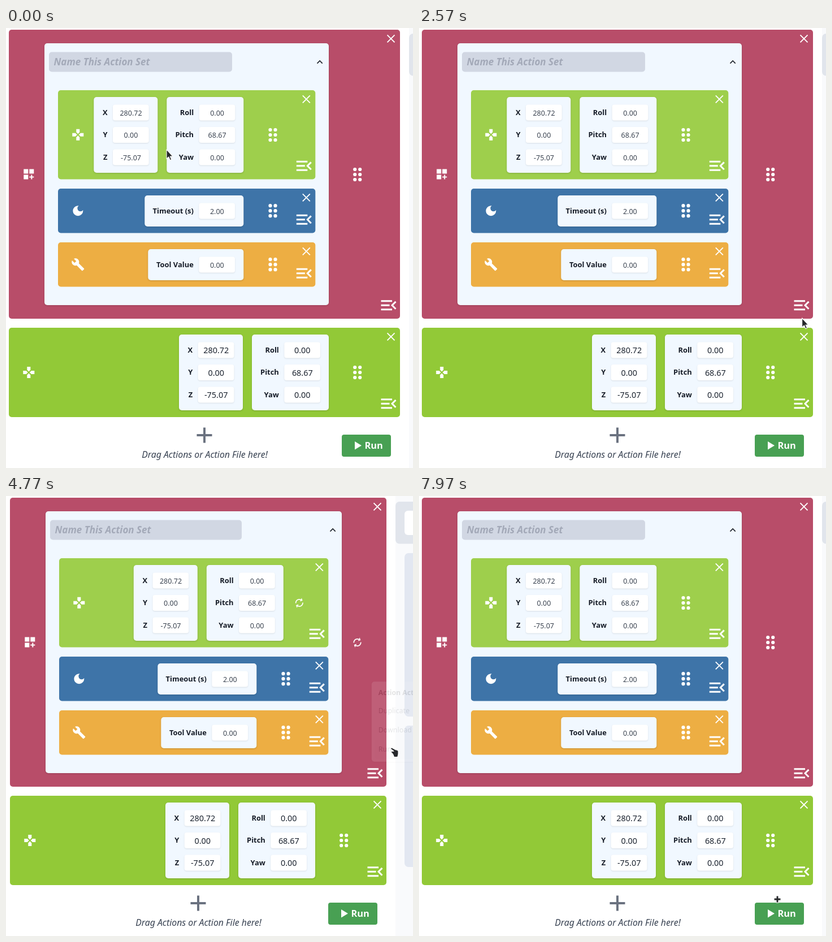
Recreate the animation shown at these times as an HTML page. Size 720 by 778 pixels, loop 8 s.

```html
<!DOCTYPE html>
<html lang="en">
<head>
<meta charset="utf-8">
<title>Action list</title>
<style>
html, body { margin: 0; width: 100%; height: 100%; overflow: hidden; background: #fff; }
svg { display: block; width: 100vw; height: 100vh; }
text { font-family: "Fira Sans", "Noto Sans", "Open Sans", sans-serif; }
.box { fill: #f1f8ff; filter: drop-shadow(0 1px 1.5px rgba(0,0,0,.16)); }
.input { fill: #fff; filter: drop-shadow(0 1px 1px rgba(0,0,0,.1)); }
.label { font-size: 12.9px; font-weight: 600; fill: #151b26; text-anchor: end; }
.value { font-size: 12.5px; fill: #3a4350; text-anchor: middle; }
.big { font-size: 14.4px; fill: #1c2430; }
.icon, .dots { fill: #fff; }
.line { fill: none; stroke: #fff; stroke-width: 1.9; }
.name { font-size: 17px; font-weight: 600; font-style: italic; fill: #a3a9b8; }
.hint { font-size: 15.8px; font-style: italic; fill: #374151; text-anchor: middle; }
.run { font-size: 16.4px; font-weight: 600; fill: #fff; }
.menu text { font-size: 13px; fill: #1c222c; }
.menu .head { font-size: 12.8px; font-weight: 700; fill: #000; }
.sheet { fill: #fff; filter: drop-shadow(0 1px 3px rgba(0,0,0,.25)); }
.cursor path { fill: #26282b; stroke: #fff; stroke-width: 1.1; stroke-linejoin: round; }
</style>
</head>
<body>
<svg id="stage" viewBox="0 0 720 778" preserveAspectRatio="none"></svg>
<script>
const LOOP = 8000;
const RUN = 4700, PAUSE = 4960, TOOL = 6990, DONE = 7180;
const MENU = { open: 3030, shown: 3130, close: 4690, gone: 4780 };

const ICON = {
  pad: "M15 7.5V2H9v5.5l3 3zM7.5 9H2v6h5.5l3-3zM9 16.5V22h6v-5.5l-3-3zM16.5 9l-3 3 3 3H22V9z",
  moon: "M12 3a9 9 0 1 0 9 9c0-.46-.04-.92-.1-1.36a5.39 5.39 0 0 1-4.4 2.26 5.4 5.4 0 0 1-3.14-9.8C12.92 3.04 12.46 3 12 3z",
  tool: "M22.7 19l-9.1-9.1c.9-2.3.4-5-1.5-6.9-2-2-5-2.4-7.4-1.3L9 6 6 9 1.6 4.7C.4 7.1.9 10.1 2.9 12.1c1.9 1.9 4.6 2.4 6.9 1.5l9.1 9.1c.4.4 1 .4 1.4 0l2.3-2.3c.5-.4.5-1.1.1-1.4z",
  set: "M3 3h8v8H3zM13 3h8v8h-8zM3 13h8v8H3zM18 13h-2v3h-3v2h3v3h2v-3h3v-2h-3z",
  more: "M3 18h13v-2H3zM3 13h10v-2H3zM3 6v2h13V6zM21 15.6L17.4 12 21 8.4 19.6 7l-5 5 5 5z",
  spin: "M12 6v3l4-4-4-4v3c-4.42 0-8 3.58-8 8 0 1.57.46 3.03 1.24 4.26L6.7 14.8A6 6 0 0 1 12 6zm6.76 1.74L17.3 9.2A6 6 0 0 1 12 18v-3l-4 4 4 4v-3c4.42 0 8-3.58 8-8 0-1.57-.46-3.03-1.24-4.26z"
};

const rect = (x, y, w, h, r, attr) =>
  `<rect x="${x}" y="${y}" width="${w}" height="${h}" rx="${r}" ${attr}/>`;
const text = (x, y, cls, s) => `<text x="${x}" y="${y}" class="${cls}">${s}</text>`;
const icon = (name, cx, cy, k = 1) =>
  `<path class="icon" d="${ICON[name]}" transform="translate(${cx} ${cy}) scale(${k}) translate(-12 -12)"/>`;

function dots(cx, cy) {
  let s = "";
  for (const dx of [-4.5, 4.5]) for (const dy of [-9, 0, 9])
    s += `<circle cx="${cx + dx}" cy="${cy + dy}" r="3.1"/>`;
  return `<g class="dots" data-x="${cx}" data-y="${cy}">${s}</g>`;
}

const spinner = (cx, cy, start) =>
  `<g class="spin" data-x="${cx}" data-y="${cy}" data-start="${start}">
   <path d="${ICON.spin}" transform="scale(.88) translate(-12 -12)"/></g>`;

// Coloured card with its close and menu buttons
function card(x, y, right, bottom, color, name) {
  const cx = right - 16, cy = y + 15.8;
  return rect(x, y, right - x, bottom - y, 5, `fill="${color}"`) +
    icon(name, x + 35.3, (y + bottom) / 2) +
    `<path class="line" d="M${cx - 6.5} ${cy - 6.5}l13 13m0-13l-13 13"/>` +
    icon("more", right - 20, bottom - 23.7, 1.5);
}

const handle = (right, cy, busy, start) =>
  busy ? spinner(right - 51.5, cy, start) : dots(right - 75.3, cy);

function input(x, cy, label, value, big) {
  return text(x - 9.5, cy + 4, "label", label) +
    rect(x, cy - 14, 63.7, 28, 4, 'class="input"') +
    text(x + 32, cy + (big ? 5.6 : 5), "value " + (big ? "big" : ""), value);
}

function pose(end, y, big) {
  const x = end - 265, x2 = end - 136;
  let s = rect(x, y + 12, 113, 134, 5, 'class="box"') + rect(x2, y + 12, 136, 134, 5, 'class="box"');
  [["X", "280.72", "Roll", "0.00"], ["Y", "0.00", "Pitch", "68.67"], ["Z", "-75.07", "Yaw", "0.00"]]
    .forEach(([a, av, b, bv], i) => {
      const cy = y + 39.5 + i * 39.5;
      s += input(x + 33.7, cy, a, av, big) + input(x2 + 57.3, cy, b, bv, big);
    });
  return s;
}

const single = (end, y, w, label, value) =>
  rect(end - w, y + 12, w, 55, 5, 'class="box"') + input(end - 79, y + 39.5, label, value);

// step: 0 idle, 1 move, 2 pause, 3 tool
function scene(step) {
  const on = step > 0;
  const L = on ? 7 : 5, R = on ? 673 : 697, mid = (L + R) / 2;
  const pr = on ? R - 79 : R - 126, px = L + 63;
  const il = px + 24, ir = pr - 23.7;
  const end = n => ir - (step === n ? 79.5 : 127);
  const side = R + 16;

  let s = rect(side, 0, 60, 778, 0, 'fill="#f9fafc"') + rect(side, 10, 90, 74.5, 7, 'fill="#e1e5ec"');
  if (on) s += rect(705, 26, 60, 43, 6, 'fill="#fff"') +
    rect(705, 101, 60, 289, 7, 'fill="#e2e7f1"') + rect(705, 406, 60, 250, 7, 'fill="#e2e7f1"');

  s += card(L, 3, R, 514, "#b84d69", "set") + handle(R, 259, on, RUN) +
    rect(px, 27, pr - px, 463, 5, 'class="box"') +
    rect(px + 8, 42.5, on ? 339 : 324, 35, 5, 'fill="#d1d7e3"') +
    text(px + 16.5, 66, "name", "Name This Action Set") +
    `<path d="M${pr - 20.5} 62.6l4.6-4.6 4.6 4.6" fill="none" stroke="#20252d" stroke-width="1.7"/>`;

  s += card(il, 110, ir, 267.5, "#9ecf4c", "pad") + pose(end(1), 110) +
    handle(ir, 189, step === 1, RUN);
  s += card(il, 284, ir, 362.5, "#3e74a8", "moon") + single(end(2), 284, 175, "Timeout (s)", "2.00") +
    handle(ir, 323.2, step === 2, PAUSE);
  s += card(il, 379, ir, 457.5, "#edae43", "tool") + single(end(3), 379, 169, "Tool Value", "0.00") +
    handle(ir, 418.2, step === 3, TOOL);

  s += card(L, 530, R, 688, "#92c937", "pad") + pose(R - 126, 530, true) + handle(R, 609, false);

  s += `<path d="M${mid - 13.5} 720h27m-13.5-13.5v27" stroke="#6b7280" stroke-width="4"/>` +
    text(mid + .5, 760, "hint", "Drag Actions or Action File here!") +
    rect(R - 103, 719, 87, 39, 4, 'fill="#48a053"') +
    `<path d="M${R - 80} 731v14.5l12-7.25z" fill="#fff"/>` +
    text(R - 62.5, 744, "run", "Run");
  return `<g class="scene">${s}</g>`;
}

const menu = `<g class="menu">` +
  rect(644, 325, 126, 148, 5, 'class="sheet"') +
  rect(649, 362, 116, 35, 4, 'class="hot" fill="#f3f4f5"') +
  text(656.5, 350, "head", "Action Actions") + text(656.5, 383.5, "", "Duplicate") +
  text(656.5, 419, "", "Download") + text(656.5, 455, "", "Run") + `</g>`;

const CURSOR = {
  arrow: "M0 0V16.2L3.8 12.9 6.3 18.8 8.9 17.7 6.4 12H11z",
  grab: "M-4 8L-7 2.5C-7.5 .8-5.7.2-4.7 1.5L-3.7 3V-5C-3.7-6.9-1.6-6.9-1.4-5.2V-7.2C-1.2-8.9.9-8.8 1-7.2V-5.9C1.3-7.4 3.3-7.2 3.4-5.6V-3.6C3.8-4.9 5.7-4.6 5.7-3V3C5.7 5.5 4.6 6.5 4.2 8.4z",
  point: "M1.5 0C0-.2-1.2 1.6.2 2.8L5 6.2 1.2 6.4C-.5 6.8-.2 8.8 1.5 9L4 12.5 5.5 16.6H11.8C12 14.2 13.2 13 13 10V6.4C12.8 4.6 10.2 3.9 8 3.6z",
  cell: "M-2-6h4v4h4v4h-4v4h-4v-4h-4v-4h4z"
};
const cursors = Object.entries(CURSOR)
  .map(([k, d]) => `<path data-kind="${k}" d="${d}"/>`).join("");

const stage = document.getElementById("stage");
stage.innerHTML = [0, 1, 2, 3].map(scene).join("") + menu + `<g class="cursor">${cursors}</g>`;

const all = q => [...stage.querySelectorAll(q)];
const scenes = all(".scene"), spins = all(".spin");
const grips = [...scenes[0].querySelectorAll(".dots")];
const menuEl = stage.querySelector(".menu"), hot = stage.querySelector(".hot");
const cursorEl = stage.querySelector(".cursor"), kinds = all(".cursor path");

// time, x, y
const PATH = [
  [0, 284, 215], [430, 284, 215], [800, 474, 180], [1230, 466, 278], [1270, 466, 278],
  [1800, 639, 610], [1930, 644, 628], [2070, 682, 698], [2100, 682, 698], [2700, 677, 488],
  [3400, 677, 488], [3630, 678, 394], [3800, 679, 396], [4200, 681, 445], [5070, 681, 445],
  [5600, 464, 393], [5870, 464, 393], [6700, 461, 392], [7600, 461, 392], [7970, 634, 713], [8000, 634, 713]
];

const clamp = v => Math.max(0, Math.min(1, v));
const ease = k => k * k * (3 - 2 * k);

function cursorAt(t) {
  const i = PATH.findIndex((p, n) => n && t < p[0]);
  const a = PATH[i - 1], b = PATH[i], k = ease((t - a[0]) / (b[0] - a[0]));
  return [a[1] + (b[1] - a[1]) * k, a[2] + (b[2] - a[2]) * k];
}

function draw(t) {
  const step = t < RUN || t >= DONE ? 0 : t < PAUSE ? 1 : t < TOOL ? 2 : 3;
  scenes.forEach((g, i) => g.style.display = i === step ? "" : "none");

  const [x, y] = cursorAt(t);
  let kind = "arrow";
  if (step === 0) {
    for (const g of grips) {
      const over = Math.abs(x - g.dataset.x) < 24 && Math.abs(y - g.dataset.y) < 24;
      g.style.fill = over ? "#c9d0d3" : "#fff";
      if (over) kind = "grab";
    }
    if (y > 690 && x < 697) kind = "cell";
    if (t < MENU.open + 500 && x > 660 && Math.abs(y - 490) < 12) kind = "point";
  }
  if (t > 4000 && t < 4900 && y > 432) kind = "point";
  kinds.forEach(p => p.style.display = p.dataset.kind === kind ? "" : "none");
  cursorEl.setAttribute("transform", `translate(${x} ${y})`);

  const shown = Math.min(clamp((t - MENU.open) / 100), clamp((MENU.gone - t) / 90));
  const scale = .95 + .05 * shown;
  menuEl.style.display = shown > 0 ? "" : "none";
  menuEl.setAttribute("opacity", shown);
  menuEl.setAttribute("transform", `translate(707 399) scale(${scale}) translate(-707 -399)`);
  const item = Math.floor((y - 362) / 35.5);
  hot.style.display = item >= 0 && item < 3 ? "" : "none";
  hot.setAttribute("y", 362 + item * 35.5);

  for (const g of spins) {
    const { x: sx, y: sy, start } = g.dataset, age = t - start;
    const k = clamp((age - 200) / 400), mix = (a, b) => Math.round(a + (b - a) * k);
    g.setAttribute("transform", `translate(${sx} ${sy}) rotate(${age * .36})`);
    g.setAttribute("fill", `rgb(${mix(255, 98)},${mix(255, 98)},${mix(255, 110)})`);
  }
}

function tick() {
  draw(performance.now() % LOOP);
  requestAnimationFrame(tick);
}
tick();
</script>
</body>
</html>
```
